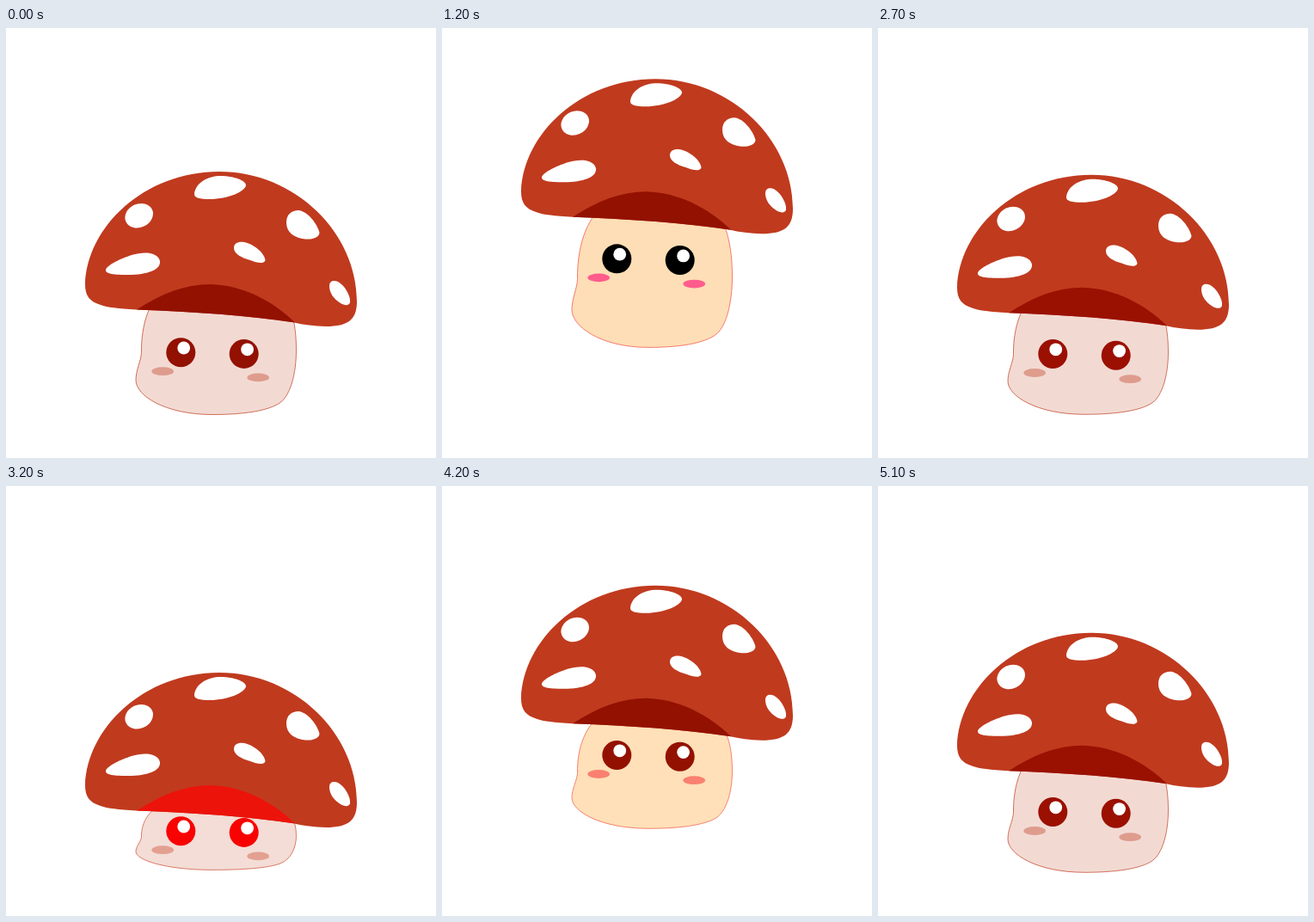
An HTML page for the animation above (5210 ms loop, 500 px wide and 500 px high).

```html
<!DOCTYPE html>
<html lang="en">
<head>
<meta charset="utf-8">
<title>Bouncing mushroom</title>
<style>
  html, body { margin: 0; width: 100%; height: 100%; overflow: hidden; background: #fff; }
  svg { display: block; width: 100%; height: 100%; }
  #body { stroke-width: .7; vector-effect: non-scaling-stroke; }
  #spots { fill: #fff; filter: blur(.6px); }
</style>
</head>
<body>
<svg viewBox="0 0 500 500">
  <path id="body" d="M188 -150C167 -136 157 -105 157.5 -72C157 -62 151 -52 151 -40C151 -22 185 0 240 0C275 0 305 -4 319 -14C331 -23 337.5 -48 337.5 -75C337.5 -110 330 -130 318 -150Z"/>
  <g id="face">
    <g id="eyes"><circle cx="203.3" cy="377.2" r="17"/><circle cx="276.7" cy="378.9" r="17"/></g>
    <g fill="#fff"><circle cx="206.7" cy="372" r="7.4"/><circle cx="280.6" cy="373.8" r="7.4"/></g>
    <g id="cheeks"><ellipse cx="182.2" cy="399.2" rx="12.8" ry="4.9"/><ellipse cx="293.2" cy="406.4" rx="12.8" ry="4.9"/></g>
  </g>
  <g id="cap">
    <path fill="#c03a1e" d="M92 298C94 232 160 167 248 167C336 167 408 238 408 318C408 339 398 347 372 347C358 347 346 345 334 342.3C280 334.3 220 330.2 152 327.6C130 326 118 325 110 322C97 318 92 311 92 298Z"/>
    <path id="under" d="M152 327.6C180 309 208 298 238 298C275 299 310 317 336 342.5C280 334.3 220 330.2 152 327.6Z"/>
    <g id="spots">
      <path d="M219 192C221 180 234 172 250 172C264 172 279 177 279 183C278 190 258 199 237 199C226 199 218 198 219 192Z"/>
      <ellipse cx="154.7" cy="218.2" rx="16.8" ry="13.6" transform="rotate(-25 154.7 218.2)"/>
      <path d="M326 226C326 217 332 212 340 212C351 213 362 228 364.5 238C364 244 356 246 348 245.5C335 244 326 238 326 226Z"/>
      <path d="M265 256C265 250 270 248 277 249C288 251 301 262 301.5 270C300 275 292 273 284 270C273 267 265 262 265 256Z"/>
      <path d="M116 281C118 275 134 268 146 264C160 260 176 260 179 271C180 280 168 286 146 287C130 287 115 287 116 281Z"/>
      <path d="M376 300C376 294 381 293 386 295C394 299 401 312 400 319C399 323 394 323 389 320C381 315 376 308 376 300Z"/>
    </g>
  </g>
</svg>
<script>
  const LOOP = 5210, STEP = 100, BOUNCE = 2600;
  const $ = id => document.getElementById(id);
  const [body, face, eyes, cheeks, cap, under] =
    ['body', 'face', 'eyes', 'cheeks', 'cap', 'under'].map($);

  // Half a bounce: rest, squash, peak. The other half mirrors it.
  const poses = [
    { at: 0, cap: 0, floor: 449.5, stretch: 1 },
    { at: 600, cap: 50, floor: 446.4, stretch: .53 },
    { at: 1300, cap: -117, floor: 367, stretch: 1.13 }
  ];
  // The face reaches its peak a little before the cap.
  const looks = [
    { at: 0, y: 0 },
    { at: 600, y: 24 },
    { at: 1270, y: -113 },
    { at: 1300, y: -113 }
  ];
  const tints = [
    { at: 0, skin: [242, 218, 211], line: [192, 58, 30], eye: [147, 17, 0], cheek: [222, 156, 141], under: [147, 17, 0] },
    { at: 600, skin: [243, 221, 214], line: [205, 75, 50], eye: [249, 2, 2], cheek: [227, 160, 144], under: [236, 19, 11] },
    { at: 1000, skin: [255, 224, 184], line: [240, 85, 65], eye: [147, 17, 0], cheek: [250, 128, 112], under: [147, 17, 0] },
    { at: 1200, skin: [254, 222, 182], line: [240, 75, 65], eye: [0, 0, 0], cheek: [255, 92, 141], under: [147, 17, 0] },
    { at: 1300, skin: [254, 222, 182], line: [240, 75, 65], eye: [0, 0, 0], cheek: [255, 92, 141], under: [147, 17, 0] }
  ];

  // Smoothstep between neighbouring keys.
  function sample(keys, t) {
    const i = Math.max(1, keys.findIndex(k => k.at >= t));
    const a = keys[i - 1], b = keys[i];
    const u = (t - a.at) / (b.at - a.at), s = u * u * (3 - 2 * u);
    const mix = (p, q) => p + (q - p) * s;
    return name => Array.isArray(a[name])
      ? `rgb(${a[name].map((v, n) => Math.round(mix(v, b[name][n])))})`
      : mix(a[name], b[name]);
  }

  const start = performance.now();

  function draw(now) {
    const time = Math.max(0, now - start) % LOOP;
    const step = Math.min(51, Math.floor(time / STEP));
    const phase = step * STEP % BOUNCE;
    const t = Math.min(phase, BOUNCE - phase);
    const pose = sample(poses, t), look = sample(looks, t), tint = sample(tints, t);

    cap.setAttribute('transform', `translate(0 ${pose('cap')})`);
    face.setAttribute('transform', `translate(0 ${look('y')})`);
    body.setAttribute('transform', `translate(0 ${pose('floor')}) scale(1 ${pose('stretch')})`);
    body.setAttribute('fill', tint('skin'));
    body.setAttribute('stroke', tint('line'));
    eyes.setAttribute('fill', tint('eye'));
    cheeks.setAttribute('fill', tint('cheek'));
    under.setAttribute('fill', tint('under'));
    requestAnimationFrame(draw);
  }
  draw(start);
</script>
</body>
</html>
```
